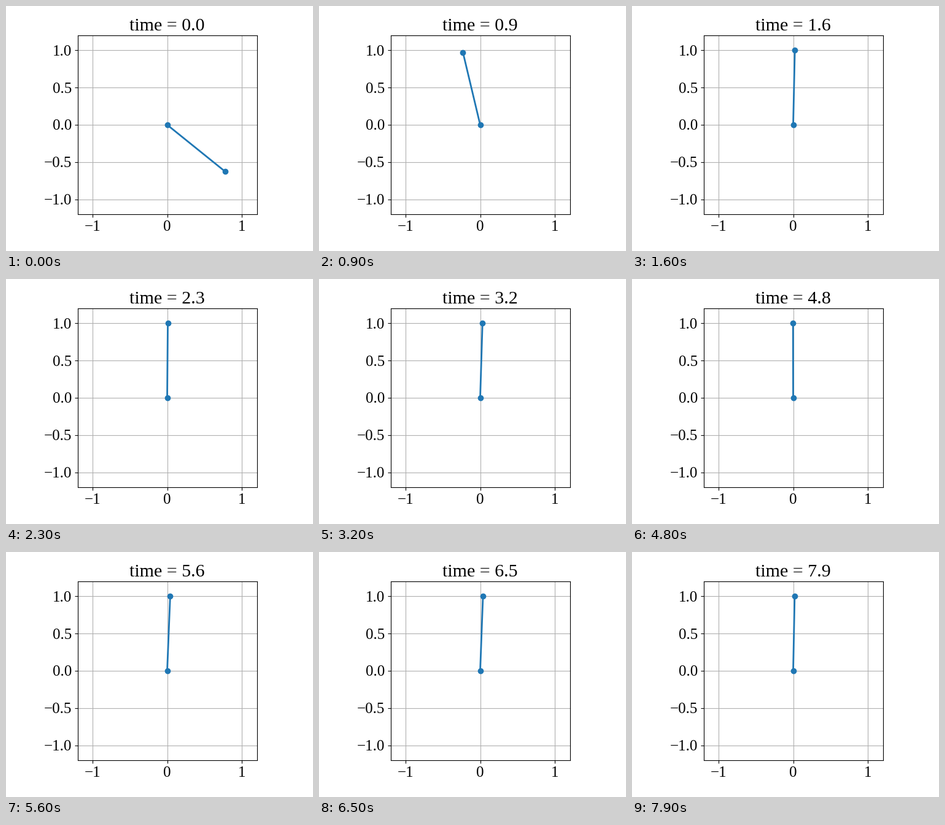
Write a matplotlib script that moves like this. It is 500 px wide and 400 px high and loops after 8000 ms.

```python
import numpy as np
import matplotlib.pyplot as plt
from matplotlib.animation import FuncAnimation

plt.rcParams["font.family"] = "Liberation Serif"
plt.rcParams["font.size"] = 18

DT = 0.1
FRAMES = 80
START = -4.033  # initial angle from upright, in radians


def angle(t):
    # swing through the bottom and settle upright
    swing = START * np.exp(-(t / 0.5465) ** 2.1)
    # small limit cycle around the upright position
    fade = np.clip(t - 1, 0, 1)
    wobble = 0.019 + 0.023 * np.cos(2 * np.pi * (t - 4.1) / 0.49)
    return swing + fade * wobble


fig, ax = plt.subplots(figsize=(5, 4), dpi=100)
fig.subplots_adjust(left=0.15, bottom=0.15)
ax.set_aspect("equal")
ax.set(xlim=(-1.2, 1.2), ylim=(-1.2, 1.2))
ax.set_xticks([-1, 0, 1])
ax.set_yticks(np.arange(-1, 1.1, 0.5))
ax.grid()
rod, = ax.plot([], [], "o-", lw=2)
title = ax.set_title("time = 0.0")


def update(i):
    t = i * DT
    th = angle(t)
    rod.set_data([0, np.sin(th)], [0, np.cos(th)])
    title.set_text(f"time = {t:.1f}")
    return rod, title


anim = FuncAnimation(fig, update, frames=FRAMES, interval=100, repeat=True)
plt.show()
```
